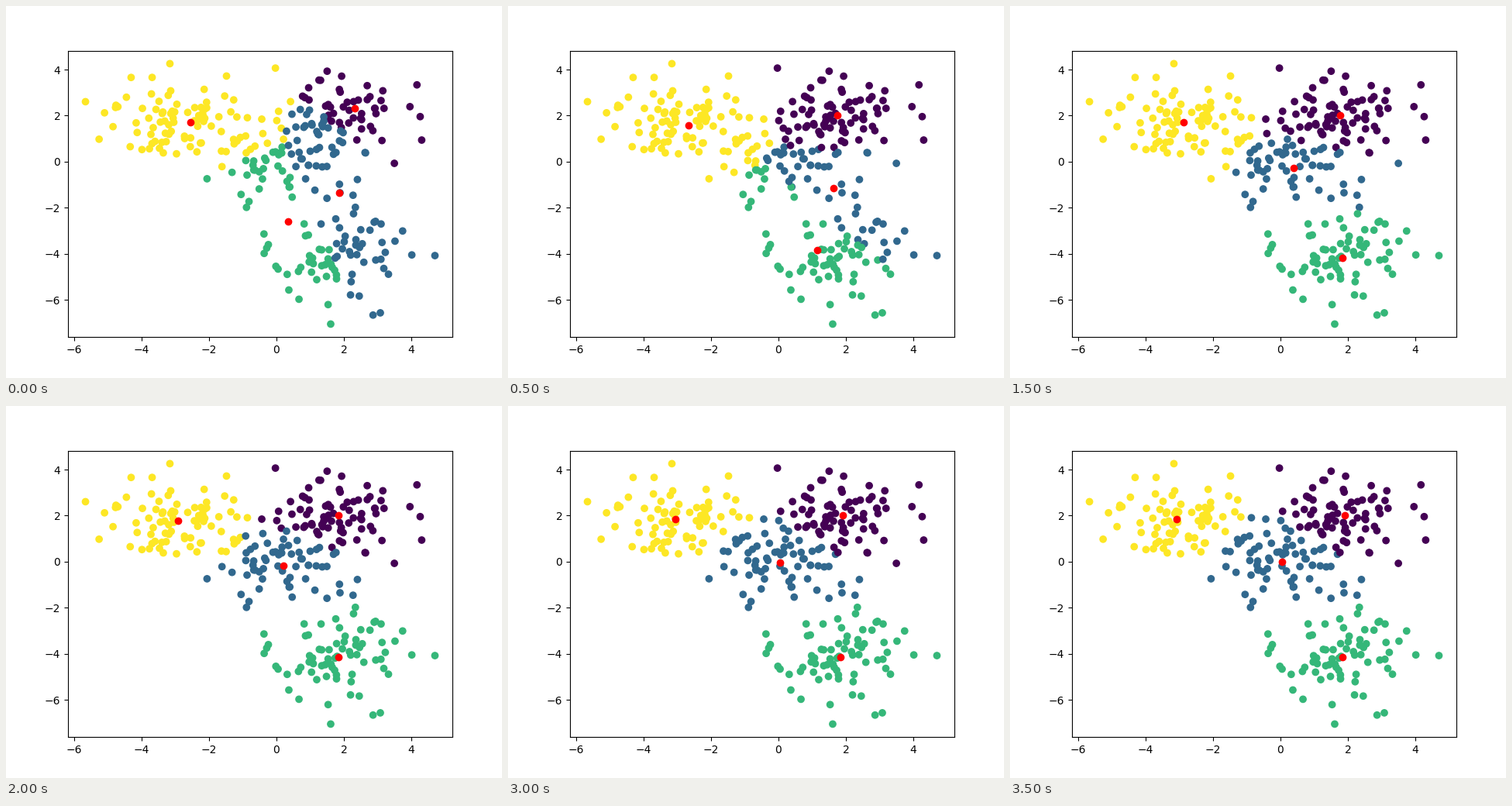
These frames come from a looping animation (640x480 px, 4.5 s). A matplotlib script:

```python
import numpy as np
import matplotlib.pyplot as plt
from matplotlib.animation import FuncAnimation

STEPS = 9
BLOB_CENTERS = [(0, 0), (2, 2), (-3, 2), (2, -4)]
BLOB_SIZE = 75
START = [(2.94942, 2.08755), (0.99978, 0.45523),
         (-0.31155, 0.05617), (-0.63585, 0.67643)]


def make_points():
    rng = np.random.RandomState(0)
    points = np.vstack([rng.normal(loc=c, scale=1.0, size=(BLOB_SIZE, 2))
                        for c in BLOB_CENTERS])
    order = np.arange(len(points))
    rng.shuffle(order)
    return points[order]


def lloyd(points, centers, steps):
    """Return (labels, cluster means) for each k-means step."""
    history = []
    for _ in range(steps):
        dist = np.linalg.norm(points[:, None] - centers[None], axis=2)
        labels = dist.argmin(axis=1)
        centers = np.array([points[labels == k].mean(axis=0)
                            for k in range(len(centers))])
        history.append((labels, centers))
    return history


points = make_points()
history = lloyd(points, np.array(START), STEPS)

fig, ax = plt.subplots(figsize=(6.4, 4.8), dpi=100)
labels, centers = history[0]
dots = ax.scatter(points[:, 0], points[:, 1], c=labels,
                  cmap="viridis", vmin=0, vmax=3)
means = ax.scatter(centers[:, 0], centers[:, 1], c="r")
ax.set_xlim(ax.get_xlim())
ax.set_ylim(ax.get_ylim())


def update(step):
    labels, centers = history[step]
    dots.set_array(labels)
    means.set_offsets(centers)
    return dots, means


anim = FuncAnimation(fig, update, frames=STEPS, interval=500,
                     init_func=lambda: update(0), repeat=True, repeat_delay=0)
plt.show()
```
